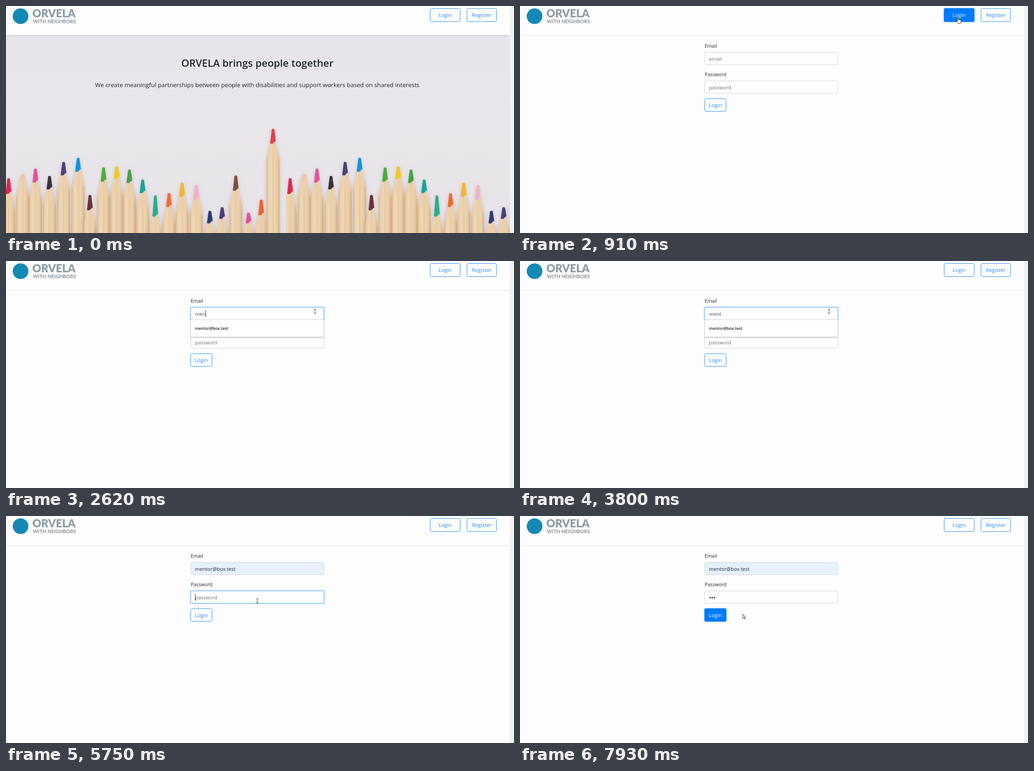
An HTML page with a canvas that plays this animation: 1118x501 px, repeating every 7.99 s.

```html
<!DOCTYPE html>
<html lang="en">
<head>
<meta charset="utf-8">
<title>Login demo</title>
<style>
html, body { margin: 0; width: 100%; height: 100%; overflow: hidden; background: #fdfdfd; }
canvas { display: block; }
</style>
</head>
<body>
<canvas id="stage" width="1118" height="501"></canvas>
<script>
const W = 1118, H = 501, LOOP = 7990;
const SANS = '"Open Sans", "Noto Sans", sans-serif';
const INK = '#212529', MUTED = '#6c757d', BLUE = '#007bff';
const stage = document.getElementById('stage');
let g = stage.getContext('2d');

const EMAILS = ['k.dorvelin@post.test', 'parent@box.test', 'mentor@box.test',
  'maker@box.test', 'qv@post.test', 'blorven@q.test'];
const LOGIN = EMAILS[2];

// x, top of the tip, end of the lead, colour
const PENCILS = [
  [5, 380, 415, '#d92b50'], [36, 371, 386, '#efc6a0'], [64, 359, 390, '#e5509b'],
  [95, 375, 405, '#39343b'], [126, 344, 374, '#4d4279'], [158, 335, 366, '#1294dc'],
  [184, 417, 451, '#6b3239'], [214, 356, 388, '#4fab3f'], [243, 354, 382, '#f0cb16'],
  [271, 361, 391, '#43a248'], [300, 383, 413, '#10a79c'], [328, 418, 465, '#2bae8b'],
  [358, 413, 444, '#f06c2f'], [387, 390, 422, '#f3b62b'], [418, 395, 428, '#f1b1c5'],
  [448, 452, 480, '#2d3b76'], [475, 444, 470, '#473f76'], [505, 374, 408, '#7b503e'],
  [533, 456, 480, '#e5509b'], [561, 427, 462, '#ed622d'], [587, 271, 304, '#e34249']
];

const CURSOR = [
  [130, 1007, 333, 'arrow'], [210, 989, 74, 'arrow'], [440, 989, 74, 'arrow'],
  [600, 964, 25, 'hand'], [990, 964, 25, 'hand'], [1070, 870, 55, 'arrow'],
  [1230, 683, 107, 'beam'], [1780, 683, 107, 'beam'], [1860, 680, 111, 'beam'],
  [3800, 680, 111, 'beam'], [4360, 452, 131, 'arrow'], [4580, 452, 131, 'arrow'],
  [4740, 450, 146, 'arrow'], [5200, 450, 146, 'arrow'], [5520, 522, 174, 'beam'],
  [5670, 553, 187, 'beam'], [6910, 553, 187, 'beam'], [7140, 500, 200, 'arrow'],
  [7370, 421, 219, 'hand'], [7850, 421, 219, 'hand'], [7930, 490, 216, 'arrow']
];
const STEP = 78;
const CLICKS = [[750, 910], [1460, 1540], [4740, 4820], [5590, 5670], [7450, 7600]];

const within = (t, a, b) => t >= a && t < b;
const ramp = (t, a) => Math.max(0, Math.min(1, (t - a) / 150));

function text(str, x, y, size, color = INK, weight = 400, align = 'left', family = SANS) {
  g.font = `${weight} ${size}px ${family}`;
  g.textAlign = align;
  g.fillStyle = color;
  g.fillText(str, x, y);
}

function box(x, y, w, h, r, fill, stroke) {
  g.beginPath();
  g.roundRect(x, y, w, h, r);
  if (fill) { g.fillStyle = fill; g.fill(); }
  if (stroke) { g.strokeStyle = stroke; g.lineWidth = 1; g.stroke(); }
}

function ring(x, y, w, h) {
  box(x - 2, y - 2, w + 4, h + 4, 4, 'rgba(0,123,255,.28)');
}

function pencil([x, top, end, color]) {
  const neck = end + 36, wood = g.createLinearGradient(x - 14.5, 0, x + 14.5, 0);
  ['#dab488', '#ebd2ad', '#efd9b8', '#e7caa2', '#ecd4b1', '#e6c99f', '#d5ae80']
    .forEach((c, i) => wood.addColorStop(i / 6, c));
  g.save();
  g.shadowColor = 'rgba(165,125,125,.4)';
  g.shadowBlur = 10;
  g.fillStyle = wood;
  g.beginPath();
  g.moveTo(x - 2.5, top + 1);
  g.lineTo(x - 6, end);
  g.quadraticCurveTo(x - 11, end + 18, x - 14, neck);
  g.lineTo(x - 14.5, H + 10);
  g.lineTo(x + 14.5, H + 10);
  g.lineTo(x + 14, neck);
  g.quadraticCurveTo(x + 11, end + 18, x + 6, end);
  g.lineTo(x + 2.5, top + 1);
  g.fill();
  g.restore();

  // sharpened part is a little paler than the barrel
  g.fillStyle = 'rgba(238,207,172,.5)';
  g.beginPath();
  g.moveTo(x - 6, end - 4);
  g.quadraticCurveTo(x - 11, end + 18, x - 13.5, neck);
  for (const cx of [-9, 0, 9]) {
    g.quadraticCurveTo(x + cx, neck - 8, x + cx + 4.5, neck);
  }
  g.quadraticCurveTo(x + 11, end + 18, x + 6, end - 4);
  g.fill();

  g.fillStyle = color;
  g.beginPath();
  g.moveTo(x - 2.8, top + 1);
  g.quadraticCurveTo(x, top - 1, x + 3, top + 1);
  g.lineTo(x + 6.3, end - 6);
  g.quadraticCurveTo(x + 3, end - 5, x + .5, end - 1);
  g.quadraticCurveTo(x - 3, end + 1, x - 6.3, end - 1);
  g.fill();
}

function makePhoto() {
  const c = document.createElement('canvas'), screen = g;
  c.width = 1109; c.height = H;
  g = c.getContext('2d');
  const sky = g.createLinearGradient(0, 64, 0, H);
  sky.addColorStop(0, '#e7e5e9');
  sky.addColorStop(.5, '#e9e7eb');
  sky.addColorStop(1, '#e6e2e7');
  for (const [left, shift] of [[0, .6], [616, 620.2]]) {
    g.save();
    g.beginPath();
    g.rect(left, 64, left ? 493 : 616, H);
    g.clip();
    g.fillStyle = sky;
    g.fillRect(0, 64, 1109, H);
    g.translate(shift, 0);
    PENCILS.forEach(pencil);
    g.restore();
  }
  g = screen;
  return c;
}
const photo = makePhoto();

function button(label, x, y, w, h, fill, focus) {
  if (focus) ring(x, y, w, h);
  box(x, y, w, h, 3, '#fdfdfd', '#2a8ff7');
  if (fill) {
    g.globalAlpha = fill;
    box(x, y, w, h, 3, BLUE, BLUE);
    g.globalAlpha = 1;
  }
  text(label, x + w / 2, y + h / 2 + 4, 11.4, fill > .5 ? '#fff' : '#1f88f5', 400, 'center');
}

function header(t, home) {
  if (home) {
    const shade = g.createLinearGradient(0, 64, 0, 68);
    shade.addColorStop(0, 'rgba(0,0,0,.08)');
    shade.addColorStop(1, 'rgba(0,0,0,0)');
    g.fillStyle = shade;
    g.fillRect(0, 64, 1109, 4);
    g.fillStyle = '#fefefe';
    g.fillRect(0, 0, 1109, 64);
  } else {
    g.fillStyle = '#ebebeb';
    g.fillRect(0, 64.5, 1109, 1.5);
  }
  g.fillStyle = '#1489b5';
  g.beginPath();
  g.arc(32, 22.5, 17.3, 0, 7);
  g.fill();
  const brand = 'Lato, "Open Sans", sans-serif';
  text('ORVELA', 58, 25, 24, '#8f9ca5', 900, 'left', brand);
  text('WITH NEIGHBORS', 59, 38, 10.8, '#8f9ca5', 800, 'left', brand);
  const hover = ramp(t, 530) * (1 - ramp(t, 1000));
  button('Login', 933.5, 5.5, 66, 29, hover, within(t, 910, 1540));
  button('Register', 1014.5, 5.5, 65, 29, 0, false);
}

function hero() {
  g.drawImage(photo, 0, 0);
  text('ORVELA brings people together', 553.2, 134, 22.25, INK, 600, 'center');
  text('We create meaningful partnerships between people with disabilities and ' +
    'support workers based on shared interests', 553, 178.5, 13.26, INK, 400, 'center');
}

function field(y, h, focus, fill) {
  if (focus) ring(406.5, y, 293, h);
  box(406.5, y, 293, h, 3, fill, focus ? '#80bdff' : '#ced4da');
}

function caret(x, y) {
  g.fillStyle = '#333';
  g.fillRect(x, y - 8, 1, 15);
}

function dropdown(items, hover) {
  const h = 11.6 + 26.4 * items.length;
  g.save();
  g.shadowColor = 'rgba(0,0,0,.35)';
  g.shadowBlur = 3;
  g.shadowOffsetY = 1;
  box(406.5, 129.5, 293, h, 2, '#fff');
  g.restore();
  box(406.5, 129.5, 293, h, 2, null, '#d4d4d4');
  if (hover) {
    g.fillStyle = '#ececec';
    g.fillRect(407, 135, 292, 26.4);
  }
  items.forEach((s, i) => text(s, 415.5, 151.5 + 26.4 * i, 8.8, INK, 600));
}

function form(t) {
  const emailFocus = within(t, 1540, 5670), passFocus = within(t, 5670, 7600);
  const chosen = t >= 4660;
  const typed = LOGIN.slice(0, [2240, 2470, 2620, 3180].filter(k => t >= k).length);
  text('Email', 406.5, 92, 10.65);
  field(102.5, 27, emailFocus, chosen ? '#e8f0fe' : '#fefefe');
  if (chosen) text(LOGIN, 416, 121, 11);
  else text(typed || 'email', 416, 121, 11, typed ? '#495057' : MUTED);
  if (within(t, 1540, 3800)) {
    caret(416 + (typed ? g.measureText(typed).width : 0), 116.5);
  }

  text('Password', 406.5, 155, 10.65);
  field(165.5, 27, passFocus, '#fefefe');
  const dots = [6060, 6290, 6440].filter(k => t >= k).length;
  if (!dots) text('password', 416, 184, 10.85, MUTED);
  g.fillStyle = '#3c4248';
  for (let i = 0; i < dots; i++) {
    g.beginPath();
    g.arc(418.3 + 4.8 * i, 180.2, 1.75, 0, 7);
    g.fill();
  }
  if (passFocus) caret(416 + 4.8 * dots, 179.5);

  button('Login', 406.5, 204.5, 47, 28, ramp(t, 7290), t >= 7600);

  if (within(t, 1620, 4970)) {
    const items = t < 2320 ? EMAILS : t < 2470 ? EMAILS.slice(2, 4) : [LOGIN];
    dropdown(items, t >= 4660);
  }
}

function path(points) {
  g.beginPath();
  points.forEach(([x, y]) => g.lineTo(x, y));
  g.closePath();
  g.fill();
  g.stroke();
}

const SHAPES = {
  arrow() {
    path([[.5, .5], [.5, 10], [2.6, 8], [4, 11.5], [5.5, 10.8], [4.1, 7.5], [6.8, 7.3]]);
  },
  hand() {
    path([[-1, 1], [0, 0], [1, 1], [1, 5], [5.5, 6], [6.5, 7.5], [6.3, 10.5],
      [5, 13.5], [-.5, 13.5], [-3.5, 9], [-3.5, 7.5], [-2.5, 7.5], [-1, 9]]);
  },
  beam() {
    g.strokeStyle = '#333';
    g.beginPath();
    for (const y of [-4.5, 4.5]) {
      g.moveTo(-2.5, y);
      g.lineTo(2.5, y);
    }
    g.moveTo(0, -4.5);
    g.lineTo(0, 4.5);
    g.stroke();
  }
};

function cursor(t) {
  const i = CURSOR.findLastIndex(k => t >= k[0]);
  if (i < 0) return;
  const a = CURSOR[i], b = CURSOR[i + 1] || a;
  const n = Math.max(1, Math.round((b[0] - a[0]) / STEP));
  const p = b === a ? 0 : Math.floor((t - a[0]) / (b[0] - a[0]) * n + 1e-6) / n;
  const x = a[1] + (b[1] - a[1]) * p, y = a[2] + (b[2] - a[2]) * p;
  if (CLICKS.some(([from, to]) => within(t, from, to))) {
    g.fillStyle = 'rgba(235,225,30,.55)';
    g.beginPath();
    g.arc(x - 1, y + 2.5, 9.5, 0, 7);
    g.fill();
  }
  g.save();
  g.translate(x, y);
  g.fillStyle = '#fff';
  g.strokeStyle = '#222';
  g.lineWidth = .9;
  g.lineJoin = 'round';
  SHAPES[a[3]]();
  g.restore();
}

function draw(t) {
  const home = t < 910;
  g.fillStyle = '#fdfdfd';
  g.fillRect(0, 0, W, H);
  if (home) hero();
  header(t, home);
  if (!home) form(t);
  g.fillStyle = '#f1f1f1';
  g.fillRect(1109, 0, 9, H);
  cursor(t);
}

const start = performance.now();
function tick() {
  draw((performance.now() - start) % LOOP);
  requestAnimationFrame(tick);
}
tick();
</script>
</body>
</html>
```
